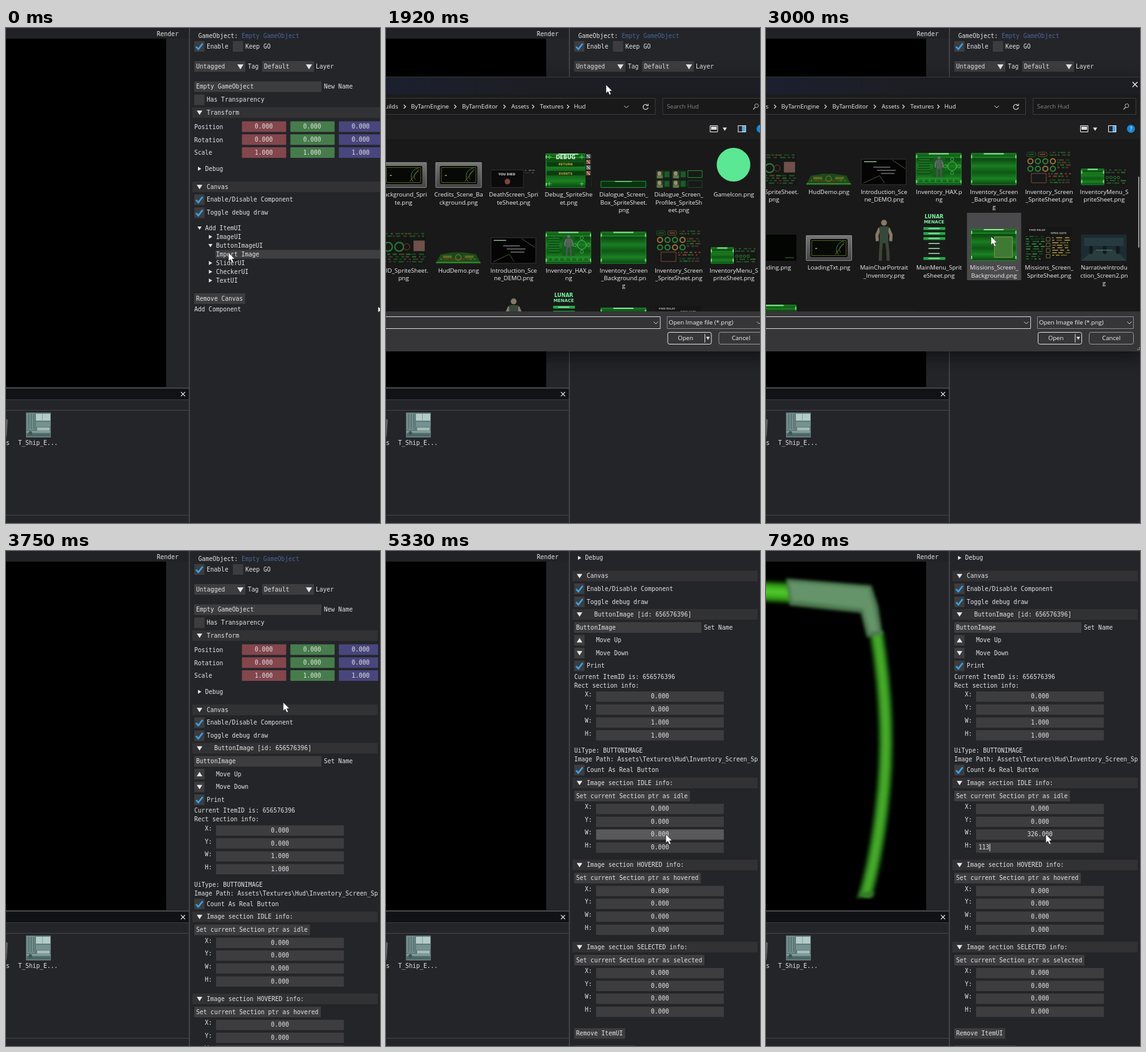
Recreate the animation shown at these times as an HTML page with a canvas. Size 600x793 px, loop 8000 ms.

```html
<!DOCTYPE html>
<html>
<head>
<meta charset="utf-8">
<style>
html, body { margin: 0; width: 100%; height: 100%; overflow: hidden; background: #242529; }
canvas { display: block; }
</style>
</head>
<body>
<canvas id="stage" width="600" height="793"></canvas>
<script>
const ctx = document.getElementById('stage').getContext('2d');
const MONO = '9.6px "DejaVu Sans Mono", monospace';
const SANS = '9.6px "Open Sans", sans-serif';
const LOOP = 8000, OPEN = 400, CLOSE = 3660, EDIT_W = 5830, EDIT_H = 7170, SHOWN = 7580;
const SCROLL = 214.5;
const FRAME = '#3d3d40';
let time = 0, mouse = [0, 0], panelY = 0;

const cursorPath = [
  [0, 357, 360], [420, 357, 360], [1350, 100, 87], [1580, 100, 87], [1920, 353, 91],
  [2080, 338, 91], [2480, 345, 262], [3000, 361, 334], [3420, 440, 238], [3720, 445, 240],
  [4200, 426, 451], [4500, 426, 451], [5330, 449, 454]
];
const dialogPath = [[1580, 0, 0], [1920, 255.5, 5], [2080, 240, 5]];

const ease = p => p * p * (3 - 2 * p);
const ramp = (a, b) => ease(Math.min(1, Math.max(0, (time - a) / (b - a))));

function follow(path) {
  if (time <= path[0][0]) return path[0].slice(1);
  for (let i = 1; i < path.length; i++) {
    const [t0, x0, y0] = path[i - 1], [t1, x1, y1] = path[i];
    if (time < t1) {
      const p = ease((time - t0) / (t1 - t0));
      return [x0 + (x1 - x0) * p, y0 + (y1 - y0) * p];
    }
  }
  return path[path.length - 1].slice(1);
}

function seeded(seed) {
  return () => (seed = (seed * 16807) % 2147483647) / 2147483647;
}

function rect(x, y, w, h, color, radius = 0) {
  ctx.fillStyle = color;
  ctx.beginPath();
  ctx.roundRect(x, y, w, h, radius);
  ctx.fill();
}

function outline(x, y, w, h, color, radius = 0) {
  ctx.strokeStyle = color;
  ctx.lineWidth = 1;
  ctx.beginPath();
  ctx.roundRect(x + .5, y + .5, w - 1, h - 1, radius);
  ctx.stroke();
}

function line(points, color, width = 1) {
  ctx.strokeStyle = color;
  ctx.lineWidth = width;
  ctx.beginPath();
  points.forEach(([x, y]) => ctx.lineTo(x, y));
  ctx.stroke();
}

function poly(points, color) {
  ctx.fillStyle = color;
  ctx.beginPath();
  points.forEach(([x, y]) => ctx.lineTo(x, y));
  ctx.fill();
}

function disc(x, y, r, color) {
  ctx.fillStyle = color;
  ctx.beginPath();
  ctx.arc(x, y, r, 0, 7);
  ctx.fill();
}

function ring(x, y, r, color, from = 0, to = 7, width = 1) {
  ctx.strokeStyle = color;
  ctx.lineWidth = width;
  ctx.beginPath();
  ctx.arc(x, y, r, from, to);
  ctx.stroke();
}

function text(s, x, y, color = '#e4e4e4', font = MONO, align = 'left') {
  ctx.font = font;
  ctx.textAlign = align;
  ctx.fillStyle = color;
  ctx.fillText(s, x, y + 3.4);
}

const label = (s, x, y, align) => text(s, x, y, '#f2f2f2', SANS, align);

function arrow(x, y, dir, s = 4.5, color = '#e6e6e6') {
  ctx.save();
  ctx.translate(x, y);
  ctx.rotate({ right: 0, down: Math.PI / 2, up: -Math.PI / 2 }[dir]);
  poly([[-s * .75, -s], [s * .85, 0], [-s * .75, s]], color);
  ctx.restore();
}

const chevron = (x, y, c = '#d0d0d0') => line([[x - 3.5, y - 1.5], [x, y + 2], [x + 3.5, y - 1.5]], c);

function cross(x, y, r) {
  line([[x - r, y - r], [x + r, y + r]], '#eee', 1.2);
  line([[x + r, y - r], [x - r, y + r]], '#eee', 1.2);
}

// Inspector widgets; y is the vertical centre of a row.
function check(s, y, on = true, x = 302) {
  rect(x, y - 8.5, 16.5, 17, FRAME);
  if (on) line([[x + 3, y + .5], [x + 6.5, y + 4.5], [x + 13.5, y - 4.5]], '#3ba3ea', 2.6);
  text(s, x + 20, y);
}

function header(s, y, x = 322) {
  rect(299, y - 8.5, time < CLOSE ? 301 : 297, 17, '#323235');
  arrow(310.5, y, 'down');
  text(s, x, y);
}

function button(s, y) {
  rect(302, y - 8.5, s.length * 5.78 + 6.5, 17, FRAME);
  text(s, 305, y);
}

function combo(s, x, w) {
  rect(x, 53, w, 17, FRAME);
  text(s, x + 3, 62);
  arrow(x + w - 8, 62, 'down', 5);
}

function input(s, y, caption) {
  rect(302, y - 8.5, 204, 17, FRAME);
  text(s, 305, y);
  text(caption, 510, y);
}

function tree(s, y, x, open) {
  arrow(x, y, open ? 'down' : 'right', 3.3);
  text(s, x + 9, y);
}

function field(name, y, value, edit) {
  const over = time > CLOSE && time < EDIT_W && mouse[0] > 337 && mouse[0] < 542 &&
    Math.abs(mouse[1] - y - panelY) < 10;
  text(name + ':', 319, y - 3);
  rect(337, y - 8, 205, 16.5, over ? '#59595c' : FRAME);
  if (edit == null) return text(value, 439.5, y, '#e4e4e4', MONO, 'center');
  if (edit === '') rect(341, y - 6, 29, 12, '#35587f');
  text(edit || value, 341, y);
  rect(341 + (edit || value).length * 5.78 + .3, y - 6, 1, 12, '#eee');
}

function section(kind, y) {
  header(`Image section ${kind.toUpperCase()} info:`, y);
  button(`Set current Section ptr as ${kind}`, y + 21);
  const idle = kind === 'idle';
  let w = '0.000', editW, editH;
  if (idle && time >= EDIT_W) {
    if (time < EDIT_H) editW = time < 6670 ? '' : time < 6830 ? '3' : time < 6920 ? '32' : '326';
    else {
      w = '326.000';
      editH = time < 7330 ? '' : time < 7420 ? '1' : time < SHOWN ? '11' : '113';
    }
  }
  field('X', y + 41.5, '0.000');
  field('Y', y + 62, '0.000');
  field('W', y + 82.5, w, editW);
  field('H', y + 103.5, '0.000', editH);
}

function addMenu() {
  tree('Add ItemUI', 320.5, 310.5, true);
  tree('ImageUI', 334.5, 328);
  tree('ButtonImageUI', 348.5, 328, true);
  rect(336, 355.5, 264, 14, '#3f3f42');
  text('Import Image', 337, 362.5);
  tree('SliderUI', 376.5, 328);
  tree('CheckerUI', 390.5, 328);
  tree('TextUI', 404.5, 328);
  button('Remove Canvas', 433.5);
  text('Add Component', 302, 451);
  arrow(600, 451, 'right', 4);
}

function buttonItem() {
  header('ButtonImage [id: 656576396]', 101.5, 334);
  input('ButtonImage', 122.5, 'Set Name');
  [['up', 'Move Up', 143], ['down', 'Move Down', 163.5]].forEach(([dir, s, y]) => {
    rect(302, y - 8.5, 16.5, 17, FRAME);
    arrow(310.5, y, dir);
    text(s, 337, y);
  });
  check('Print', 184);
  text('Current ItemID is: 656576396', 302, 201.5);
  text('Rect section info:', 302, 215.5);
  ['X', 'Y', 'W', 'H'].forEach((n, i) => field(n, 233 + i * 20.7, i < 2 ? '0.000' : '1.000'));
  text('UiType: BUTTONIMAGE', 302, 320);
  text('Image Path: Assets\\Textures\\Hud\\Inventory_Screen_Sp', 302, 334);
  check('Count As Real Button', 351);
  ['idle', 'hovered', 'selected'].forEach((kind, i) => section(kind, 371.5 + i * 131.5));
  button('Remove ItemUI', 773);
  rect(302, 792, 98, 17, FRAME);
}

function inspector() {
  ctx.save();
  ctx.beginPath();
  ctx.rect(296, 0, time < CLOSE ? 304 : 301, 793);
  ctx.clip();
  const scrolled = -SCROLL * ramp(3980, 4330);
  ctx.translate(0, scrolled);
  text('GameObject:', 308.5, 12.5);
  text('Empty GameObject', 378, 12.5, '#4a6598');
  check('Enable', 29.5);
  check('Keep GO', 29.5, false, 364);
  combo('Untagged', 302, 82);
  text('Tag', 388, 62);
  combo('Default', 411, 83);
  text('Layer', 497, 62);
  input('Empty GameObject', 94, 'New Name');
  check('Has Transparency', 115, false);
  header('Transform', 135.5);
  ['Position', 'Rotation', 'Scale'].forEach((s, i) => {
    const y = 158 + i * 20.7;
    text(s, 302, y + .5);
    ['#83464d', '#467c4b', '#48467d'].forEach((c, k) => {
      rect(378.5 + k * 77.7, y - 8.5, 71, 17, c, 1);
      text(i < 2 ? '0.000' : '1.000', 413.5 + k * 77.7, y, '#e4e4e4', MONO, 'center');
    });
  });
  tree('Debug', 225.5, 310.5);
  header('Canvas', 254.5);
  check('Enable/Disable Component', 275);
  check('Toggle debug draw', 296);
  if (time < CLOSE) addMenu();
  else {
    panelY = scrolled + SCROLL;
    ctx.translate(0, SCROLL);
    buttonItem();
  }
  ctx.restore();
}

function glow(path, layers) {
  layers.forEach(([width, color]) => {
    ctx.strokeStyle = color;
    ctx.lineWidth = width;
    ctx.stroke(path);
  });
}

function sprite() {
  ctx.save();
  ctx.beginPath();
  ctx.rect(0, 17, 257, 558);
  ctx.clip();
  ctx.filter = 'blur(2.5px)';
  const bright = [[27, '#0d2c08'], [20, '#26701a'], [13, '#3b9b22'], [6, '#48ad2a']];
  glow(new Path2D('M-20 64L42 67'), [[36, '#0e3606'], [28, '#2c8a14'], [19, '#3fae1e'], [9, '#4cc628']]);
  glow(new Path2D('M177 130Q202 280 186 410Q177 490 159 553'), bright);
  poly([[32, 44], [169, 55], [180, 88], [187, 134], [162, 138], [152, 99], [38, 87]], '#4d7a50');
  poly([[37, 50], [164, 60], [173, 90], [180, 128], [167, 130], [156, 92], [42, 79]], '#66946a');
  poly([[153, 546], [174, 546], [171, 553], [144, 556]], '#347a26');
  ctx.restore();
}

function shipTexture(x, y) {
  rect(x, y, 40, 40, '#5f7b7a');
  rect(x + 1, y + 1, 13, 27, '#6f8b89');
  [4, 8, 12].forEach(dx => rect(x + dx, y + 2, 1, 24, '#4c6665'));
  rect(x + 16, y + 2, 23, 11, '#b4cbc8');
  rect(x + 26, y + 2, 1, 11, '#86a19e');
  rect(x + 16, y + 15, 23, 8, '#769290');
  rect(x + 18, y + 24, 20, 5, '#a3bab7');
  rect(x + 1, y + 30, 38, 2, '#8ca6a3');
  rect(x + 1, y + 34, 38, 4, '#4b6664');
  disc(x + 7, y + 33, 3, '#3d5653');
}

function editor() {
  rect(0, 0, 600, 793, '#242529');
  rect(0, 0, 294, 17, '#212226');
  rect(0, 17, 257, 558, '#000');
  text('Render', 242, 9.5);
  if (time >= SHOWN) sprite();
  rect(0, 576, 294, 1.5, '#4b4b50');
  rect(0, 578, 293, 17, '#111215');
  cross(284, 586.5, 3.3);
  rect(0, 595, 293, 1, '#3e3e43');
  rect(0, 612, 293, 1, '#45454a');
  rect(0, 780, 293, 1, '#45454a');
  rect(293.5, 0, 1.5, 793, '#4b4b50');
  poly([[0, 626], [3, 628], [1, 654], [0, 656]], '#606164');
  text('s', 0, 665);
  shipTexture(32, 616);
  text('T_Ship_E...', 19.5, 665);
  inspector();
}

// Thumbnails are 73 wide, drawn from x with their lower edge at b.
function panel(x, y, w, h) {
  const g = ctx.createLinearGradient(x, y, x, y + h);
  ['#17701d', '#0d4d12', '#1a7d21', '#0f5715', '#1b8223', '#0b4210'].forEach((c, i) => g.addColorStop(i / 5, c));
  rect(x, y, w, h, g);
  outline(x, y, w, h, '#1f8a28');
  rect(x + 1, y + 6, w - 2, 1, '#2b9f35');
  rect(x + w * .28, y, w * .44, 2, '#86e892');
  [0, w - 2].forEach(dx => {
    rect(x + dx, y + 3, 2, 5, '#6ade74');
    rect(x + dx, y + h - 8, 2, 5, '#6ade74');
  });
}

// Rows of short blocks with gaps, like sprites packed on a dark sheet.
function blocks(x, y, w, h, seed, colors) {
  const rnd = seeded(seed);
  for (let row = 0; row + 3 <= h; row += 4) {
    for (let col = 0; col < w - 3;) {
      const len = Math.min(w - col, 2 + rnd() * 8);
      rect(x + col, y + row, len, 2, colors[Math.floor(rnd() * colors.length)]);
      col += len + 1 + rnd() * 4;
    }
  }
}

function screen(x, y, w, h) {
  const g = ctx.createLinearGradient(x, y, x, y + h);
  g.addColorStop(0, '#777');
  g.addColorStop(.5, '#5c5c5c');
  g.addColorStop(1, '#444');
  rect(x, y, w, h, g, 1);
  outline(x, y, w, h, '#8b8b8b', 1);
  rect(x + 7, y + 6, w - 14, h - 12, '#060906', 2);
  outline(x + 9, y + 8, w - 18, h - 16, '#55601c');
  ring(x + w - 12, y + h / 2 + 2, 13, '#2c8d35', 2.4, 4.6);
  ring(x + w - 12, y + h / 2 + 2, 8, '#277c2e', 2.4, 4.6);
  line([[x + w - 27, y + h - 10], [x + w - 12, y + 11]], '#a05026');
  rect(x + 15, y + h / 2, 3, 1.5, '#a9a93e');
}

function person(x, y, h, skin, coat, legs) {
  const limb = (points, color) => line(points.map(([px, py]) => [x + px * h, y + py * h]), color, h * .075);
  disc(x, y + h * .09, h * .07, skin);
  limb([[-.1, .22], [-.17, .38], [-.16, .53]], skin);
  limb([[.1, .22], [.17, .38], [.16, .53]], skin);
  limb([[-.06, .5], [-.08, .75], [-.09, 1]], legs);
  limb([[.06, .5], [.09, .75], [.1, 1]], legs);
  poly([[x - h * .11, y + h * .18], [x + h * .11, y + h * .18], [x + h * .1, y + h * .58], [x - h * .1, y + h * .58]], coat);
}

const tiny = (s, x, y, size, color) => text(s, x, y, color, `bold ${size}px "DejaVu Sans", sans-serif`, 'center');
const dim = ['#1d5a25', '#5d4027', '#1b4721', '#3d3f3d', '#24702d', '#54302b'];

const thumbs = {
  frame: (x, b) => screen(x, b - 41, 74, 41),
  death(x, b) {
    rect(x, b - 29, 53, 29, '#0b0b0b');
    outline(x, b - 29, 53, 29, '#303030');
    tiny('YOU DIED', x + 26, b - 23, 5, '#ddd');
    disc(x + 27, b - 10, 4.5, '#80443e');
    blocks(x + 55, b - 29, 18, 8, 5, ['#444', '#555', '#2b2b2b']);
  },
  debug(x, b) {
    panel(x, b - 55, 73, 55);
    rect(x + 64, b - 55, 9, 55, '#191919');
    tiny('DEBUG', x + 32, b - 49, 8, '#eaffea');
    rect(x + 2, b - 41, 61, 7, '#0c3c10');
    rect(x + 2, b - 27, 61, 7, '#0c3c10');
    tiny('RETURN', x + 32, b - 39, 5, '#d3a03d');
    tiny('EVENTS', x + 32, b - 24, 5, '#d3a03d');
    [[6, 49], [6, 6], [58, 49], [58, 6]].forEach(([dx, dy]) => tiny('+', x + dx, b - dy, 11, '#51be59'));
    for (let i = 0; i < 4; i++) {
      rect(x + 65, b - 54 + i * 9, 7, 7, i % 2 ? '#8a5a46' : '#777');
      line([[x + 66, b - 53 + i * 9], [x + 71, b - 48 + i * 9]], '#ddd');
    }
  },
  bar(x, b) {
    rect(x, b - 11, 73, 11, '#0b3210');
    outline(x, b - 11, 73, 11, '#25923b');
    rect(x + 23, b - 11, 27, 1.5, '#70e884');
  },
  faces(x, b) {
    for (let i = 0; i < 4; i++) {
      const px = x + i % 2 * 26, py = b - 28 + (i >> 1) * 15;
      rect(px, py, 23, 13, '#122b16');
      rect(px + 1, py + 1, 11, 11, '#27452a');
      disc(px + 6, py + 5, 3.2, '#a88a6c');
      rect(px + 2, py + 8, 9, 5, '#66744c');
      rect(px + 14, py + 2, 8, 9, '#1d5a27');
    }
    outline(x + 51, b - 28, 24, 12, '#2b8b3b');
    outline(x + 51, b - 12, 24, 12, '#194a22');
  },
  icon: (x, b) => disc(x + 36.5, b - 37, 27, '#5ae894'),
  sheet(x, b) {
    rect(x, b - 54, 73, 54, '#171817');
    [['#1d5a25', 0], ['#6b4a2a', 18]].forEach(([c, dx]) => {
      outline(x + dx + 1, b - 53, 15, 8, c, 2);
      rect(x + dx + 4, b - 50, 9, 2, c);
    });
    blocks(x + 38, b - 53, 33, 10, 3, dim);
    for (let i = 0; i < 8; i++) ring(x + 7 + i % 4 * 12, b - 38 + (i >> 2) * 12, 4, i % 3 ? '#2c8238' : '#9a7036', 0, 7, 2);
    blocks(x + 50, b - 41, 22, 18, 8, dim);
    outline(x + 8, b - 19, 25, 16, '#7c4a32');
    blocks(x + 36, b - 19, 36, 8, 11, ['#2c8238', '#8a3a34', '#7c3a31', '#236b2e']);
    blocks(x + 38, b - 9, 32, 7, 12, dim);
  },
  hud(x, b) {
    rect(x, b - 49, 73, 49, '#151715');
    blocks(x, b - 49, 73, 10, 4, dim);
    [12, 30].forEach(dx => ring(x + dx, b - 27, 7, '#2a7d35', 0, 7, 2));
    ring(x + 42, b - 27, 5, '#7c3e30');
    rect(x + 53, b - 37, 18, 17, '#70504a');
    blocks(x, b - 16, 73, 15, 7, dim);
  },
  demo(x, b) {
    poly([[x + 8, b - 15], [x + 28, b - 18], [x + 45, b - 18], [x + 65, b - 15], [x + 73, b], [x, b]], '#1d4a19');
    rect(x + 12, b - 13, 14, 4, '#5f6a24');
    rect(x + 47, b - 13, 14, 4, '#5f6a24');
    blocks(x + 8, b - 8, 57, 5, 6, ['#6b3a22', '#2f7a2a', '#77752c']);
    ring(x + 36.5, b - 10, 4.5, '#7b8a34');
    line([[x + 1, b - 2], [x + 72, b - 2]], '#3f9a31', 1.5);
  },
  intro(x, b) {
    rect(x, b - 42, 73, 42, '#030403');
    outline(x, b - 42, 73, 42, '#3a3d3a');
    rect(x + 5, b - 38, 20, 1.5, '#8fb78f');
    [[20, 27], [26, 30], [32, 22]].forEach(([dx, w], i) => rect(x + dx, b - 29 + i * 5, w, 1, '#a9a9a9'));
    line([[x + 4, b - 3], [x + 30, b - 15], [x + 38, b - 3]], '#4a573d');
    line([[x + 50, b - 40], [x + 71, b - 26]], '#4a573d');
  },
  hax(x, b) {
    panel(x, b - 51, 73, 51);
    rect(x + 4, b - 41, 18, 24, '#0e4f14');
    for (let i = 0; i < 6; i++) rect(x + 4, b - 41 + i * 4, 18, 1, '#2b9a35');
    rect(x + 27, b - 44, 20, 31, '#155e1c');
    person(x + 37, b - 47, 36, '#666f68', '#535f57', '#4a564e');
    ring(x + 58, b - 30, 7, '#48cf55');
    [[58, 41], [58, 19], [47, 30], [69, 30]].forEach(([dx, dy]) => ring(x + dx, b - dy, 2.5, '#3bb547'));
    for (let i = 0; i < 7; i++) outline(x + 3 + i * 9.6, b - 11, 9, 8, '#2c9637');
  },
  panel: (x, b) => panel(x, b - 51, 73, 51),
  menu(x, b) {
    rect(x, b - 26, 73, 26, '#161716');
    panel(x, b - 26, 37, 26);
    blocks(x + 39, b - 25, 33, 9, 9, dim);
    for (let i = 0; i < 4; i++) ring(x + 42 + i * 6, b - 12, 2, '#2c8238');
    blocks(x + 41, b - 8, 31, 7, 2, dim);
  },
  load(x, b) {
    rect(x, b - 42, 73, 42, '#030503');
    line([[x + 55, b - 5], [x + 69, b - 5]], '#357f34');
  },
  portrait: (x, b) => person(x + 37, b - 67, 67, '#8a7868', '#34493a', '#3c4436'),
  title(x, b) {
    tiny('LUNAR', x + 29, b - 71, 8, '#76f5a3');
    tiny('MENACE', x + 29, b - 63, 7, '#76f5a3');
    for (let i = 0; i < 7; i++) {
      rect(x + 12, b - 54 + i * 8, 35, 4.5, i < 3 || i > 5 ? '#20a845' : '#181b18');
      rect(x + 20, b - 52.5 + i * 8, 18, 1.5, '#a9dcb3');
    }
  },
  mission(x, b) {
    panel(x, b - 51, 73, 51);
    rect(x + 37, b - 39, 30, 34, '#3f7a35');
    outline(x + 37, b - 39, 30, 34, '#83944c');
  },
  missions(x, b) {
    rect(x, b - 54, 73, 54, '#151615');
    tiny('FIND RELAY', x + 18, b - 51, 4, '#aaa');
    tiny('OPEN GATE', x + 52, b - 46, 4, '#aaa');
    blocks(x, b - 40, 30, 39, 10, ['#1e5b27', '#2d7d36', '#17391b']);
    for (let i = 0; i < 4; i++) outline(x + 32, b - 38 + i * 9, 7, 7, '#6f6a2c');
    blocks(x + 42, b - 38, 30, 34, 13, ['#86742c', '#5d5426', '#8f7a2d']);
  },
  story(x, b) {
    rect(x, b - 42, 73, 42, '#1d2c31');
    rect(x + 5, b - 37, 63, 13, '#263b40');
    poly([[x, b], [x + 20, b - 17], [x + 55, b - 17], [x + 73, b]], '#2a3d41');
    [13, 35, 56].forEach(dx => rect(x + dx, b - 24, 6, 13, '#12191c', 3));
    rect(x + 24, b - 18, 26, 1.5, '#3f6a6c');
  },
  none(x, b) { rect(x, b - 41, 73, 41, '#101110'); }
};

const files = [
  'Background_Spri|te.png:frame', 'Credits_Scene_Ba|ckground.png:frame', 'DeathScreen_Spri|teSheet.png:death',
  'Debug_SpriteShe|et.png:debug', 'Dialogue_Screen_|Box_SpriteSheet.|png:bar',
  'Dialogue_Screen_|Profiles_SpriteSh|eet.png:faces', 'GameIcon.png:icon',
  'HUD_SpriteSheet.|png:hud', 'HudDemo.png:demo', 'Introduction_Sce|ne_DEMO.png:intro', 'Inventory_HAX.p|ng:hax',
  'Inventory_Screen|_Background.pn|g:panel', 'Inventory_Screen|_SpriteSheet.png:sheet', 'InventoryMenu_S|priteSheet.png:menu',
  'Loading.png:load', 'LoadingTxt.png:frame', 'MainCharPortrait|_Inventory.png:portrait', 'MainMenu_Sprit|eSheet.png:title',
  'Missions_Screen_|Background.png:mission', 'Missions_Screen_|SpriteSheet.png:missions', 'NarrativeIntrodu|ction_Screen2.pn|g:story',
  'Panel.png:panel', ':', ':', ':none', ':none'
].map(s => s.split(':'));

function fileList(dx, dy, scroll) {
  ctx.save();
  ctx.beginPath();
  ctx.rect(-300, 173, 657, 276);
  ctx.clip();
  files.forEach(([name, kind], i) => {
    const cx = 302.5 - 88.3 * (6 - i % 7), b = 251 + 121.5 * Math.floor(i / 7) - scroll;
    const mx = mouse[0] - dx, my = mouse[1] - dy;
    if (name && my > 173 && Math.abs(mx - cx) < 43.5 && my > b - 77 && my < b + 31) rect(cx - 43.5, b - 77, 87, 108, '#4a4a4c');
    if (kind) thumbs[kind](cx - 37, b);
    name.split('|').forEach((s, k) => label(s, cx, b + 11 + k * 12.2, 'center'));
  });
  ctx.restore();
}

function dialog() {
  const [dx, dy] = follow(dialogPath), scroll = 126 * ramp(2480, 2700);
  ctx.save();
  ctx.translate(dx, dy);
  ctx.shadowColor = 'rgba(0,0,0,.55)';
  ctx.shadowBlur = 30;
  ctx.shadowOffsetY = 9;
  rect(-320, 73, 685, 440, '#191919', 6);
  ctx.shadowColor = 'transparent';
  const tint = ctx.createLinearGradient(-dx, 0, 230 - dx, 0);
  tint.addColorStop(0, '#1b1f2f');
  tint.addColorStop(1, '#1d1e23');
  rect(-320, 73, 685, 30, tint, [6, 6, 0, 0]);
  rect(-320, 101, 685, 40, '#1c1c1e');
  rect(-320, 141, 685, 32, '#1f1f20');
  outline(-320, 73, 685, 440, '#3b3b3e', 6);
  cross(352, 85.5, 4);

  rect(-300, 107, 477, 27, '#19191a');
  outline(-300, 107, 477, 27, '#3c3c3e');
  label('Builds', -236, 121, 'right');
  [['ByTarnEngine', -215.5], ['ByTarnEditor', -133.5], ['Assets', -54.5], ['Textures', -8.5], ['Hud', 46]]
    .forEach(([s, x]) => label(s, x, 121));
  [-225.5, -144.5, -65.5, -19.5, 36.5].forEach(x => line([[x - 1.5, 118], [x + 1.5, 121], [x - 1.5, 124]], '#ddd', 1.2));
  chevron(130, 121);
  ring(161, 121.5, 4, '#ddd', .2, 5.4, 1.2);
  line([[165, 116.5], [165, 119.5], [162, 119.5]], '#ddd', 1.2);
  rect(188, 107, 166, 27, '#19191a');
  outline(188, 107, 166, 27, '#3c3c3e');
  text('Search Hud', 195, 121, '#858585', SANS);
  ring(339, 119.5, 3, '#bbb');
  line([[337, 122], [333.5, 125.5]], '#bbb', 1.2);

  outline(264, 151, 13, 11, '#eee');
  rect(266, 153, 9, 5, '#ddd');
  arrow(288, 157, 'down', 3.3);
  rect(309, 151, 13, 11, '#eee');
  rect(310, 152, 6, 9, '#202830');
  rect(316, 152, 5, 9, '#53a9e6');
  disc(345.5, 156.5, 6.5, '#1787d5');
  text('?', 345.5, 156.5, '#fff', SANS, 'center');

  fileList(dx, dy, scroll);
  rect(357, 183 + scroll * 50 / 126, 2, 114, '#949494', 1);

  rect(-319, 449, 683, 63, '#363638', [0, 0, 6, 6]);
  rect(-300, 457, 485, 20, '#333335');
  outline(-300, 457, 485, 20, '#d8d8d8');
  chevron(177.5, 467);
  outline(195, 457, 155, 20, '#8b8b8d');
  label('Open Image file (*.png)', 198, 467);
  chevron(343, 467);
  outline(196, 482, 71, 20, '#e2e2e2', 3);
  label('Open', 225, 492, 'center');
  rect(255.5, 485, 1, 14, '#ddd');
  arrow(261, 492, 'down', 3);
  outline(278, 482, 72, 20, '#98989a', 3);
  label('Cancel', 314, 492, 'center');
  for (let i = 0; i < 3; i++) for (let k = 0; k <= i; k++) rect(361 - k * 2.6, 504 + i * 2.6, 1.4, 1.4, '#bbb');
  ctx.restore();
}

function pointer() {
  const [x, y] = mouse;
  if (time >= EDIT_W && time < EDIT_H) {
    line([[451, 449.5], [451, 461.5]], '#ddd');
    [449.5, 461.5].forEach(ly => line([[448, ly], [454, ly]], '#ddd'));
    return;
  }
  ctx.save();
  ctx.translate(x, y);
  poly([[0, 0], [0, 13.5], [3.2, 10.8], [5.6, 16], [8, 15], [5.7, 10], [9.8, 9.8]], '#fff');
  ctx.lineWidth = .5;
  ctx.strokeStyle = '#111';
  ctx.closePath();
  ctx.stroke();
  ctx.restore();
}

function draw() {
  time = performance.now() % LOOP;
  mouse = follow(cursorPath);
  editor();
  if (time >= OPEN && time < CLOSE) dialog();
  pointer();
  requestAnimationFrame(draw);
}
draw();
</script>
</body>
</html>
```
